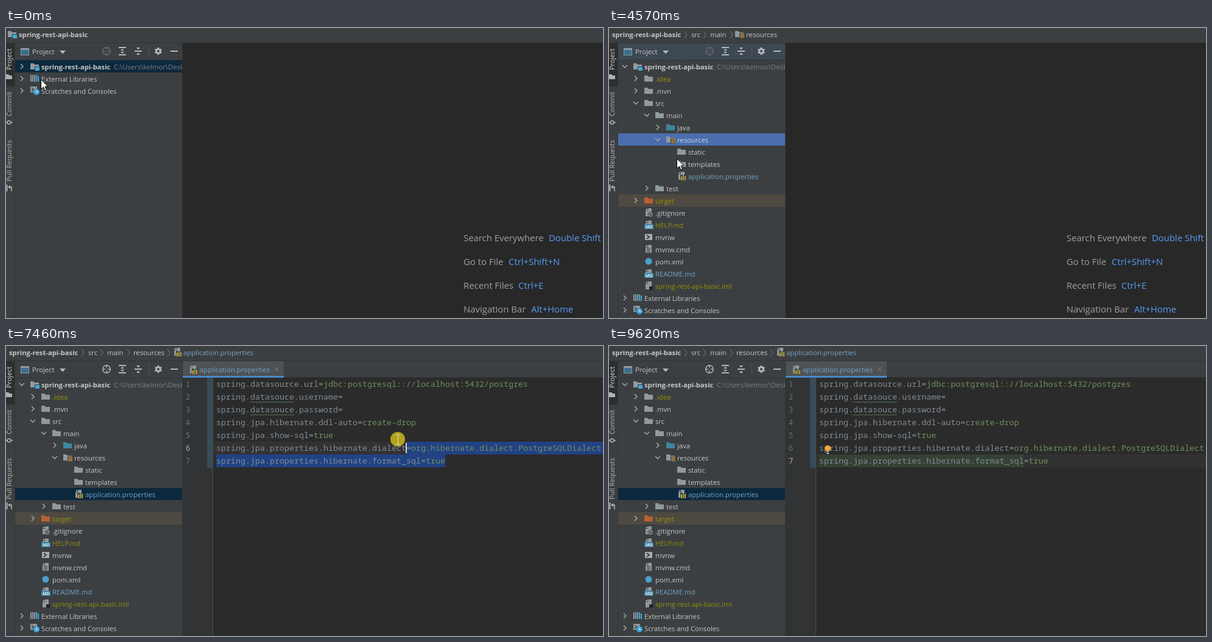
An HTML page with a canvas that plays this animation: 980x476 px, repeating every 9810 ms.

```html
<!DOCTYPE html>
<html lang="en">
<head>
<meta charset="utf-8">
<title>Opening a properties file</title>
<style>
html, body { margin: 0; width: 100%; height: 100%; overflow: hidden; background: #282828; }
canvas { display: block; }
</style>
</head>
<body>
<canvas id="stage" width="980" height="476"></canvas>
<script>
const c = document.getElementById('stage').getContext('2d');
const LOOP = 9810;
const SANS = '"Open Sans", "Noto Sans", sans-serif';
const UI = '11.25px ' + SANS, BOLD = 'bold 11.2px ' + SANS, HINT = '14.9px ' + SANS;
const CODE = '13.333px "Noto Sans Mono", "DejaVu Sans Mono", monospace';
const TEXT = '#c6c6c6', OLIVE = '#939307', BLUE = '#72a4ca', GREY = '#8f9a9f', SKY = '#40a9d8';

// Moments of the story, in ms
const FOCUS = 530, PICK_DIR = 3770, PICK_FILE = 4920, OPEN_FILE = 5250, CHECKED = 5650;
const DRAG = 6650, DRAG_END = 7780, DESELECT = 8940, CARET_OFF = 9480, BULB = 9620, LEAVE = 9160;
const OPEN = { root: 620, src: 1860, main: 3120, res: 4190 };
const CLICKS = [[530, 640], [1720, 1860], [2960, 3080], [3740, 3850], [3900, 3990],
  [4920, 5000], [5160, 5220], [DRAG, 8210], [8910, 9050]];

// Pointer path: time, x, y
const PATH = [[0, 57, 84], [30, 57, 84], [380, 25, 55], [650, 25, 55], [1300, 37, 108],
  [1520, 37, 109], [1720, 44, 117], [1950, 44, 117], [2350, 67, 156], [2540, 67, 156],
  [2790, 62, 142], [3150, 62, 142], [3550, 81, 179], [4440, 81, 179], [4570, 111, 214],
  [4770, 134, 238], [5790, 134, 238], [6240, 365, 157], [6650, 880, 285], [6790, 880, 285],
  [7460, 644, 153], [7770, 307, 63], [8050, 280, 29], [8350, 281, 30], [8900, 617, 462],
  [LOOP, 617, 462]];

// level, label, icon, colour, time shown, time expanded (Infinity: stays closed)
const TREE = [
  [0, 'spring-rest-api-basic', 'module', TEXT, 0, OPEN.root],
  [1, '.idea', 'folder', OLIVE, OPEN.root, Infinity],
  [1, '.mvn', 'folder', TEXT, OPEN.root, Infinity],
  [1, 'src', 'folder', TEXT, OPEN.root, OPEN.src],
  [2, 'main', 'folder', TEXT, OPEN.src, OPEN.main],
  [3, 'java', 'source', TEXT, OPEN.main, Infinity],
  [3, 'resources', 'resources', TEXT, OPEN.main, OPEN.res],
  [4, 'static', 'folder', TEXT, OPEN.res],
  [4, 'templates', 'folder', TEXT, OPEN.res],
  [4, 'application.properties', 'props', BLUE, OPEN.res],
  [2, 'test', 'folder', TEXT, OPEN.src, Infinity],
  [1, 'target', 'excluded', OLIVE, OPEN.root, Infinity],
  [1, '.gitignore', 'ignore', TEXT, OPEN.root],
  [1, 'HELP.md', 'md', OLIVE, OPEN.root],
  [1, 'mvnw', 'shell', TEXT, OPEN.root],
  [1, 'mvnw.cmd', 'doc', TEXT, OPEN.root],
  [1, 'pom.xml', 'dot', TEXT, OPEN.root],
  [1, 'README.md', 'md', BLUE, OPEN.root],
  [1, 'spring-rest-api-basic.iml', 'iml', OLIVE, OPEN.root],
  [0, 'External Libraries', 'libs', TEXT, 0, Infinity],
  [0, 'Scratches and Consoles', 'scratch', TEXT, 0, Infinity]
];

const LINES = [
  'spring.datasource.url=jdbc:postgresql:://localhost:5432/postgres',
  'spring.datasouce.username=',
  'spring.datasouce.password=',
  'spring.jpa.hibernate.ddl-auto=create-drop',
  'spring.jpa.show-sql=true',
  'spring.jpa.properties.hibernate.dialect=org.hibernate.dialect.PostgreSQLDialect',
  'spring.jpa.properties.hibernate.format_sql=true'
];
const LAST = LINES.length - 1, X0 = 345, ADV = 8, TOP = 52, ROW = 21;

const clamp = (v, a, b) => Math.max(a, Math.min(b, v));

function rect(x, y, w, h, color) {
  c.fillStyle = color;
  c.fillRect(x, y, w, h);
}

function text(s, x, y, color = TEXT, font = UI) {
  c.font = font;
  c.fillStyle = color;
  c.fillText(s, x, y);
}

function line(points, color, width = 1) {
  c.strokeStyle = color;
  c.lineWidth = width;
  c.beginPath();
  points.forEach(([x, y]) => c.lineTo(x, y));
  c.stroke();
}

function poly(points, color) {
  c.fillStyle = color;
  c.beginPath();
  points.forEach(([x, y]) => c.lineTo(x, y));
  c.fill();
}

function disc(x, y, r, color) {
  c.fillStyle = color;
  c.beginPath();
  c.arc(x, y, r, 0, 7);
  c.fill();
}

function ring(x, y, r, color, width = 1) {
  c.strokeStyle = color;
  c.lineWidth = width;
  c.beginPath();
  c.arc(x, y, r, 0, 7);
  c.stroke();
}

function folder(x, y, color = GREY) {
  poly([[x, y + 3], [x + 5, y + 3], [x + 7, y + 5], [x + 14, y + 5], [x + 14, y + 13], [x, y + 13]], color);
}

function page(x, y) {
  poly([[x + 6, y + 1], [x + 12, y + 1], [x + 12, y + 14], [x + 2, y + 14], [x + 2, y + 5], [x + 6, y + 5]], GREY);
  poly([[x + 5, y + 1], [x + 5, y + 4], [x + 2, y + 4]], '#c0c7ca');
}

const icons = {
  folder,
  source: (x, y) => folder(x, y, '#3e86a0'),
  excluded: (x, y) => folder(x, y, '#b8602f'),
  module(x, y) {
    folder(x, y);
    rect(x + 7, y + 8, 8, 7, '#3c3f41');
    rect(x + 8, y + 9, 7, 6, SKY);
  },
  resources(x, y) {
    folder(x, y);
    rect(x + 7, y + 6, 8, 9, '#3c3f41');
    for (let i = 0; i < 4; i++) rect(x + 8, y + 7 + i * 2, 7, 1, '#d99a3a');
  },
  props(x, y) {
    page(x, y);
    rect(x + 5, y + 6, 10, 9, '#3c3f41');
    rect(x + 6, y + 9, 2, 6, '#e0a243');
    rect(x + 9, y + 6, 2, 9, '#62b543');
    rect(x + 12, y + 8, 2, 7, '#d9893f');
  },
  ignore(x, y) {
    page(x, y);
    disc(x + 10, y + 11, 4.5, '#3c3f41');
    ring(x + 10, y + 11, 3.2, '#aeb6b9');
    line([[x + 8, y + 13], [x + 12, y + 9]], '#aeb6b9');
  },
  md(x, y) {
    page(x, y);
    rect(x, y + 7, 15, 8, '#3c87a8');
    text('MD', x + 2, y + 14, '#e1edf2', 'bold 7px ' + SANS);
  },
  shell(x, y) {
    rect(x + 1, y + 3, 12, 10, '#a3adb1');
    line([[x + 4, y + 5], [x + 8, y + 8], [x + 4, y + 11]], '#35383a', 1.6);
  },
  doc(x, y) {
    page(x, y);
    for (let i = 0; i < 4; i++) rect(x + 4, y + 6 + i * 2, 6, 1, '#45494b');
  },
  dot: (x, y) => disc(x + 7, y + 8, 5.5, '#4a9fca'),
  iml(x, y) {
    page(x, y);
    rect(x + 8, y + 9, 6, 6, '#222426');
  },
  libs(x, y) {
    [0, 3, 6].forEach(d => rect(x + d, y + 2, 2, 11, GREY));
    rect(x + 9, y + 2, 2, 11, SKY);
    rect(x + 12, y + 4, 2, 9, SKY);
  },
  scratch(x, y) {
    rect(x, y + 1, 11, 10, GREY);
    line([[x + 2, y + 3], [x + 5, y + 6], [x + 2, y + 9]], '#3c3f41', 1.3);
    disc(x + 10, y + 10, 5.5, '#3c3f41');
    disc(x + 10, y + 10, 5, '#41a6dc');
    line([[x + 10, y + 7], [x + 10, y + 10.5], [x + 12.5, y + 10.5]], '#e8f4fa');
  }
};

function pointer(t) {
  const i = PATH.findIndex(p => p[0] > t);
  const [a, ax, ay] = PATH[i - 1], [b, bx, by] = PATH[i];
  const k = (t - a) / (b - a);
  return [ax + (bx - ax) * k, ay + (by - ay) * k];
}

function caretAt(t) {
  if (t < DRAG) return [0, 0];
  if (t >= DESELECT) return [LAST, 34];
  const [x, y] = pointer(Math.min(t, DRAG_END) - 30);
  const row = t < 6790 ? LAST : clamp(Math.floor((y - TOP) / ROW), 0, LAST);
  const col = t < 6790 ? 47 : clamp(Math.round((x - X0) / ADV), 0, LINES[row].length);
  return [row, col];
}

function drawCrumbs(t) {
  rect(0, 0, 980, 24, '#3c3f41');
  rect(0, 24, 980, 1, '#313335');
  if (t < PICK_DIR) {
    icons.module(3, 2);
    text(TREE[0][1], 21, 15, TEXT, BOLD);
    return;
  }
  const opened = t >= OPEN_FILE;
  const chevron = x => line([[x, 5], [x + 4, 11], [x, 17]], '#777b7d');
  text(TREE[0][1], 5, 15, TEXT, BOLD);
  text('src', 135, 15);
  text('main', 166, 15);
  [124, 155, 199].forEach(chevron);
  if (opened) {
    text('resources', 209, 15);
    chevron(265);
    icons.props(274, 2);
    text('application.properties', 291, 15, BLUE);
  } else {
    icons.resources(207, 2);
    text('resources', 225, 15);
  }
}

function sideLabel(s, y, color = '#b3b3b3') {
  c.save();
  c.translate(9, y);
  c.rotate(-Math.PI / 2);
  text(s, 0, 0, color, '10.9px ' + SANS);
  c.restore();
}

function drawStrip() {
  rect(0, 25, 14, 451, '#3c3f41');
  rect(0, 25, 14, 71, '#2c2e2f');
  rect(14, 25, 1, 451, '#323436');
  sideLabel('Project', 69, '#dadada');
  sideLabel('Commit', 145);
  sideLabel('Pull Requests', 252);
  poly([[0, 76], [4, 76], [6, 78], [10, 78], [10, 84], [0, 84]], '#afb1b3');
  ring(5, 155, 2.8, '#afb1b3', 1.6);
  line([[0, 155], [2, 155]], '#afb1b3', 1.5);
  line([[8, 155], [11, 155]], '#afb1b3', 1.5);
  line([[1.5, 257], [1.5, 268]], '#afb1b3', 2);
  line([[9, 268], [9, 261], [4, 261]], '#afb1b3', 1.6);
  poly([[3, 261], [7, 258], [7, 264]], '#afb1b3');
}

function drawHeader(t, focused) {
  const ink = '#b4b8ba';
  rect(15, 25, 274, 27, focused ? '#3d4853' : '#3c3f41');
  rect(15, 52, 274, 1, '#35383a');
  rect(24, 33, 14, 12, '#8f9ba1');
  rect(25, 36, 12, 8, '#386f8c');
  text('Project', 43, 43);
  poly([[88, 37], [98, 37], [93, 42.5]], ink);

  const aim = t >= OPEN_FILE ? ink : '#656a6d';
  ring(165, 38, 6.2, aim, 1.4);
  [[-1, 0], [1, 0], [0, -1], [0, 1]].forEach(([dx, dy]) =>
    line([[165 + dx * 2, 38 + dy * 2], [165 + dx * 7, 38 + dy * 7]], aim, 1.4));

  rect(185, 31, 12, 2, ink);
  rect(185, 43, 12, 2, ink);
  poly([[188, 37], [191, 34], [194, 37]], ink);
  poly([[188, 39], [191, 42], [194, 39]], ink);
  rect(211, 37, 12, 2, ink);
  poly([[214, 32], [220, 32], [217, 35.5]], ink);
  poly([[214, 44], [220, 44], [217, 40.5]], ink);
  rect(234, 29, 1, 19, '#515557');

  for (let i = 0; i < 6; i++) {
    const a = i * Math.PI / 3 + Math.PI / 6, dx = Math.cos(a), dy = Math.sin(a);
    line([[250 + dx * 3, 38 + dy * 3], [250 + dx * 6, 38 + dy * 6]], ink, 3);
  }
  ring(250, 38, 3.3, ink, 2.6);

  if (t > 8020 && t < 8400) rect(265, 27, 23, 23, '#4c5052');
  rect(270, 37, 12, 2, ink);
}

function drawTree(t, focused) {
  rect(15, 53, 274, 423, '#3c3f41');
  const picked = t < PICK_DIR ? TREE[0][1] : t < PICK_FILE ? 'resources' : 'application.properties';
  c.save();
  c.beginPath();
  c.rect(15, 53, 274, 423);
  c.clip();
  TREE.filter(r => t >= r[4]).forEach(([level, label, icon, color, , opens], i) => {
    const y = 53 + i * 20, x = 26 + level * 18, hot = focused && label === picked;
    if (icon === 'excluded') rect(15, y, 274, 20, '#4f4a41');
    if (label === picked) rect(15, y, 274, 20, hot ? '#4b6eaf' : '#0d293e');
    if (opens !== undefined) {
      const arrow = t >= opens ? [[-4, -2], [0, 2], [4, -2]] : [[-2, -4], [2, 0], [-2, 4]];
      line(arrow.map(([dx, dy]) => [x + dx, y + 10 + dy]), '#abaeb0', 1.4);
    }
    icons[icon](x + 14, y + 2);
    text(label, x + 32, y + 15, hot ? '#d0d4da' : color, i ? UI : BOLD);
    if (!i) text('C:\\Users\\kelmor\\Desktop', 177, y + 15, hot ? '#b4bfce' : '#7d8183');
  });
  c.restore();
  rect(289, 25, 1, 451, '#313335');
}

function drawHints() {
  rect(290, 25, 690, 451, '#282828');
  [['Search Everywhere', 'Double Shift', 891], ['Go to File', 'Ctrl+Shift+N', 825],
    ['Recent Files', 'Ctrl+E', 841], ['Navigation Bar', 'Alt+Home', 862]].forEach(([name, keys, x], i) => {
    text(name, 751, 350 + i * 39, '#a0a0a0', HINT);
    text(keys, x, 350 + i * 39, '#589df6', HINT);
  });
}

function drawTab(active) {
  rect(290, 25, 690, 27, '#3c3f41');
  rect(290, 51, 690, 1, '#323232');
  rect(290, 25, 166, 24, '#4e5254');
  rect(290, 49, 166, 3, active ? '#4a88c7' : '#747a80');
  icons.props(300, 31);
  text('application.properties', 318, 43, BLUE);
  line([[441, 35], [447, 41]], '#7b8083');
  line([[447, 35], [441, 41]], '#7b8083');
}

function squiggle(x0, x1, y) {
  const points = [];
  for (let x = x0; x <= x1; x += 2) points.push([x, y + (x - x0) / 2 % 2 * 2]);
  line(points, '#517a57');
}

function drawEditor(t) {
  const [row, col] = caretAt(t), lit = t >= DRAG && t < DESELECT;
  rect(290, 52, 690, 424, '#2b2b2b');
  rect(290, 52, 49, 424, '#313335');
  rect(339, 52, 1, 424, '#4a4d4f');
  rect(340, TOP + row * ROW, 640, ROW, '#323232');
  rect(330, TOP, 9, ROW * LINES.length + 1, '#374b59');
  if (t >= DESELECT) rect(X0, TOP + LAST * ROW, 42 * ADV, ROW, '#344134');

  LINES.forEach((s, i) => {
    const y = TOP + i * ROW, eq = s.indexOf('=');
    if (lit && i >= row) {
      const a = i === row ? X0 + col * ADV : X0;
      const b = i === LAST ? X0 + s.length * ADV : 980;
      rect(a, y, b - a, ROW, '#214283');
    }
    text(i + 1, 295, y + 15, i === row ? '#b0b0b0' : '#6e7275', '12px "Noto Sans Mono", monospace');
    text(s.slice(0, eq), X0, y + 15, '#7f8b95', CODE);
    text('=', X0 + eq * ADV, y + 15, '#8a9299', CODE);
    text(s.slice(eq + 1), X0 + (eq + 1) * ADV, y + 15, '#6f8f5d', CODE);
    if (t >= CHECKED && s.includes('datasouce')) squiggle(401, 473, y + 18);
  });

  if (t >= DRAG && t < CARET_OFF) {
    rect(Math.max(X0, X0 + col * ADV - 1), TOP + row * ROW + 2, 2, 17, '#d0d0d0');
  }
  if (t >= BULB) {
    disc(359, 168, 5, '#f0a732');
    rect(357, 173, 4, 1, '#b8bcbe');
    rect(357, 175, 4, 2, '#b8bcbe');
  }
}

function drawPointer(t) {
  if (t >= LEAVE) return;
  const [x, y] = pointer(t).map(Math.round);
  if (CLICKS.some(([a, b]) => t >= a && t < b)) disc(x, y, 12, 'rgba(202, 186, 24, .84)');
  if (t >= OPEN_FILE && x > 341 && y > TOP) {
    const ink = '#dedede';
    rect(x, y - 7, 1, 15, ink);
    [-8, 8].forEach(d => {
      rect(x - 3, y + d, 3, 1, ink);
      rect(x + 1, y + d, 3, 1, ink);
    });
    return;
  }
  const shape = [[0, 0], [0, 16], [4, 12.5], [6.5, 18.5], [9, 17.5], [6.5, 11.5], [11.5, 11.5], [0, 0]]
    .map(([dx, dy]) => [x + dx + .5, y + dy + .5]);
  poly(shape, '#ffffff');
  line(shape, '#000000');
}

function draw(t) {
  const focused = t >= FOCUS && t < DRAG;
  drawCrumbs(t);
  drawStrip();
  drawHeader(t, focused);
  drawTree(t, focused);
  if (t < OPEN_FILE) drawHints();
  else {
    drawTab(!focused);
    drawEditor(t);
  }
  drawPointer(t);
}

const start = performance.now();
function tick() {
  draw((performance.now() - start) % LOOP);
  requestAnimationFrame(tick);
}
tick();
</script>
</body>
</html>
```
